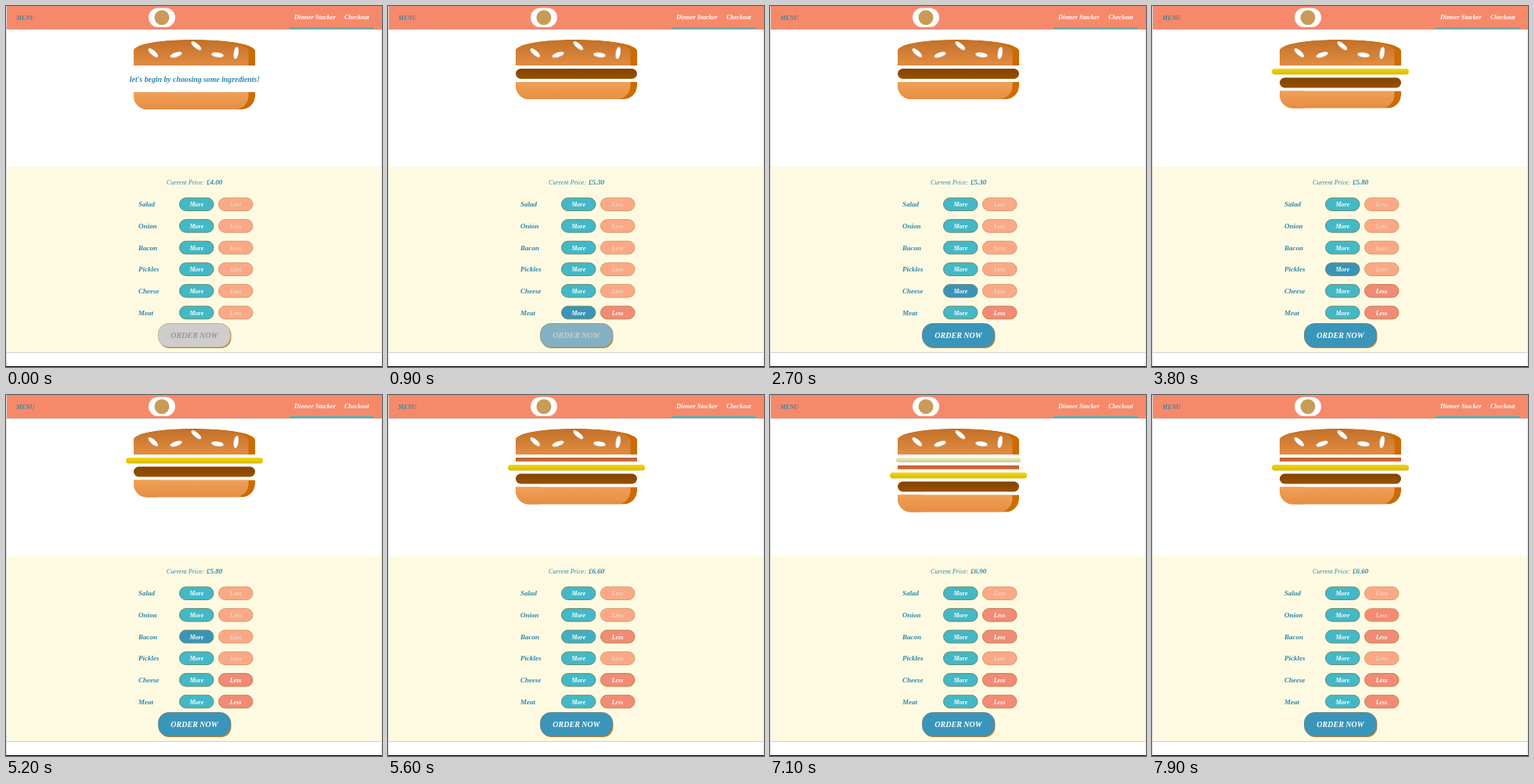
These frames come from a looping animation (480x461 px, 8 s). An HTML page with a canvas:

```html
<!DOCTYPE html>
<html lang="en">
<head>
<meta charset="utf-8">
<title>Build your meal</title>
<style>
html, body { margin: 0; width: 100%; height: 100%; overflow: hidden; background: #fff; }
canvas { display: block; width: 480px; height: 461px; }
</style>
</head>
<body>
<canvas id="stage" width="480" height="461"></canvas>
<script>
const ctx = document.getElementById('stage').getContext('2d');
const LOOP = 8000;
const ROWS = ['Salad', 'Onion', 'Bacon', 'Pickles', 'Cheese', 'Meat'];
const INK = '#2e86a8';

// Layers from top to bottom; each is present between "from" and "to".
const LAYERS = [
  { name: 'Onion', price: 0.3, from: 5900, to: 7400, x: 161, w: 159, h: 6, r: 3, colors: ['#efefc4', '#cfc98d'] },
  { name: 'Bacon', price: 0.8, from: 5300, to: LOOP, x: 163, w: 155, h: 5, r: 0, colors: ['#bf5a2b', '#cf7646'] },
  { name: 'Cheese', price: 0.5, from: 3100, to: LOOP, x: 153, w: 175, h: 7.5, r: 3.7, colors: ['#f2d70d', '#d9b900'] },
  { name: 'Meat', price: 1.3, from: 800, to: LOOP, x: 163, w: 155, h: 13, r: 6.5, colors: ['#834300', '#975000'] }
];

const HOVERS = [
  { row: 'Meat', kind: 'More', from: 150, to: 1450 },
  { row: 'Cheese', kind: 'More', from: 2150, to: 3350 },
  { row: 'Pickles', kind: 'More', from: 3500, to: 4050 },
  { row: 'Bacon', kind: 'More', from: 4600, to: 5450 },
  { row: 'Onion', kind: 'More', from: 5600, to: 6350 },
  { row: 'Onion', kind: 'Less', from: 6800, to: LOOP }
];

const clamp = v => Math.max(0, Math.min(1, v));
const ramp = (t, start, span = 200) => clamp((t - start) / span);

function mix(a, b, k) {
  const channel = (c, i) => parseInt(c.slice(1 + i * 2, 3 + i * 2), 16);
  return 'rgb(' + [0, 1, 2].map(i => Math.round(channel(a, i) + (channel(b, i) - channel(a, i)) * k)) + ')';
}

function text(str, x, y, size, color, { align = 'left', weight = 'bold' } = {}) {
  ctx.font = `italic ${weight} ${size}px "Liberation Serif", serif`;
  ctx.textAlign = align;
  ctx.textBaseline = 'alphabetic';
  ctx.fillStyle = color;
  ctx.fillText(str, x, y);
}

function rect(x, y, w, h, color) {
  ctx.fillStyle = color;
  ctx.fillRect(x, y, w, h);
}

function pill(x, y, w, h, r, fill, stroke) {
  ctx.beginPath();
  ctx.roundRect(x, y, w, h, r);
  ctx.fillStyle = fill;
  ctx.fill();
  if (stroke) {
    ctx.strokeStyle = stroke;
    ctx.lineWidth = 1;
    ctx.stroke();
  }
}

function gradient(y, h, colors) {
  const g = ctx.createLinearGradient(0, y, 0, y + h);
  colors.forEach((c, i) => g.addColorStop(i / (colors.length - 1), c));
  return g;
}

// A bun is one shape with a copy shifted left, leaving a dark right rim.
function bun(path, fill) {
  ctx.save();
  ctx.clip(path);
  ctx.fillStyle = '#cb6c00';
  ctx.fill(path);
  ctx.translate(-8.5, 0);
  ctx.fillStyle = fill;
  ctx.fill(path);
  ctx.fillRect(163, 0, 40, 200);
  ctx.restore();
}

function topBun() {
  const p = new Path2D();
  p.moveTo(163, 76);
  p.lineTo(163, 57);
  p.ellipse(240.5, 57, 77.5, 14, 0, Math.PI, 2 * Math.PI);
  p.lineTo(318, 76);
  p.closePath();
  bun(p, gradient(43, 33, ['#c27028', '#e28c43']));
  [[188, 59.5, 42], [217, 62, -18], [243, 50.5, 40], [270, 62.2, 8], [294, 60, 99]].forEach(([x, y, deg]) => {
    ctx.save();
    ctx.translate(x, y);
    ctx.rotate(deg * Math.PI / 180);
    for (const [dy, color] of [[0.9, '#d5c9bf'], [0, '#fff']]) {
      ctx.beginPath();
      ctx.ellipse(0, dy, 7.8, 2.7, 0, 0, 2 * Math.PI);
      ctx.fillStyle = color;
      ctx.fill();
    }
    ctx.restore();
  });
}

function bottomBun(y) {
  const p = new Path2D();
  p.roundRect(163, y, 155, 22, [0, 0, 17, 17]);
  bun(p, gradient(y, 22, ['#f0a057', '#e58e43']));
}

function burger(layers) {
  const gap = 4;
  topBun();
  if (!layers.length) {
    text("let's begin by choosing some ingredients!", 241, 97, 9.8, INK, { align: 'center' });
    bottomBun(110);
    return;
  }
  let y = 76 + gap;
  for (const l of layers) {
    pill(l.x, y, l.w, l.h, l.r, gradient(y, l.h, l.colors));
    y += l.h + gap;
  }
  bottomBun(y);
}

function header() {
  rect(0, 0, 480, 29, '#f7896b');
  rect(0, 29, 480, 1, '#d08f7b');
  text('MENU', 13, 18, 7.8, '#4b839b');
  pill(182, 2.5, 34, 24.5, 12.2, '#fff');
  ctx.beginPath();
  ctx.arc(199, 14.7, 9.5, 0, 2 * Math.PI);
  ctx.fillStyle = '#c99b58';
  ctx.fill();
  text('Dinner Stacker', 368, 17, 8.4, '#fff');
  text('Checkout', 432, 17, 8, '#fff');
  rect(362, 27, 107, 2.5, '#5baeb2');
}

function hoverLevel(row, kind, t) {
  return HOVERS.filter(h => h.row === row && h.kind === kind)
    .reduce((k, h) => Math.max(k, ramp(t, h.from) * (1 - ramp(t, h.to))), 0);
}

function controls(t, layers) {
  rect(0, 205, 480, 237, '#fefae2');
  const price = layers.reduce((sum, l) => sum + l.price, 4);
  text('Current Price:', 205, 227.7, 8.2, INK, { weight: 'normal' });
  text('£' + price.toFixed(2), 256, 227.7, 9, INK);

  ROWS.forEach((row, i) => {
    const y = 245 + i * 27.65;
    const active = layers.some(l => l.name === row);
    const lessHover = hoverLevel(row, 'Less', t);
    text(row, 169, y + 11.4, 9, INK);
    pill(221.5, y, 43.5, 16.5, 8.2, mix('#43b8c6', '#3994b8', hoverLevel(row, 'More', t)), '#70896a');
    text('More', 243.3, y + 11.4, 8, '#fff', { align: 'center' });
    pill(271.5, y, 43.5, 16.5, 8.2, active ? '#f18b75' : mix('#fba985', '#f48a70', lessHover), active ? '#c77f50' : '#d69b70');
    text('Less', 293, y + 11.4, 8, active ? '#fff' : '#e9d5cb', { align: 'center' });
  });

  const ready = ramp(t, LAYERS[3].from);
  pill(195.5, 406.5, 92, 30.5, 13, '#c48730');
  pill(194.5, 405.5, 92, 30, 13, mix('#cecdcc', '#3995ba', ready), mix('#c4ad96', '#6b8687', ready));
  text('ORDER NOW', 240.5, 424.2, 10, mix('#979797', '#ffffff', ready), { align: 'center' });
}

function draw(now) {
  const t = now % LOOP;
  const layers = LAYERS.filter(l => t >= l.from && t < l.to);
  rect(0, 0, 480, 461, '#fff');
  header();
  burger(layers);
  controls(t, layers);
  rect(0, 442, 480, 1, '#cfcfcb');
  rect(0, 0, 1, 460, '#dededb');
  rect(479, 30, 1, 430, '#e6e6e2');
  rect(0, 460, 480, 1, '#000');
}

const start = performance.now();
function tick() {
  draw(performance.now() - start);
  requestAnimationFrame(tick);
}
tick();
</script>
</body>
</html>
```
